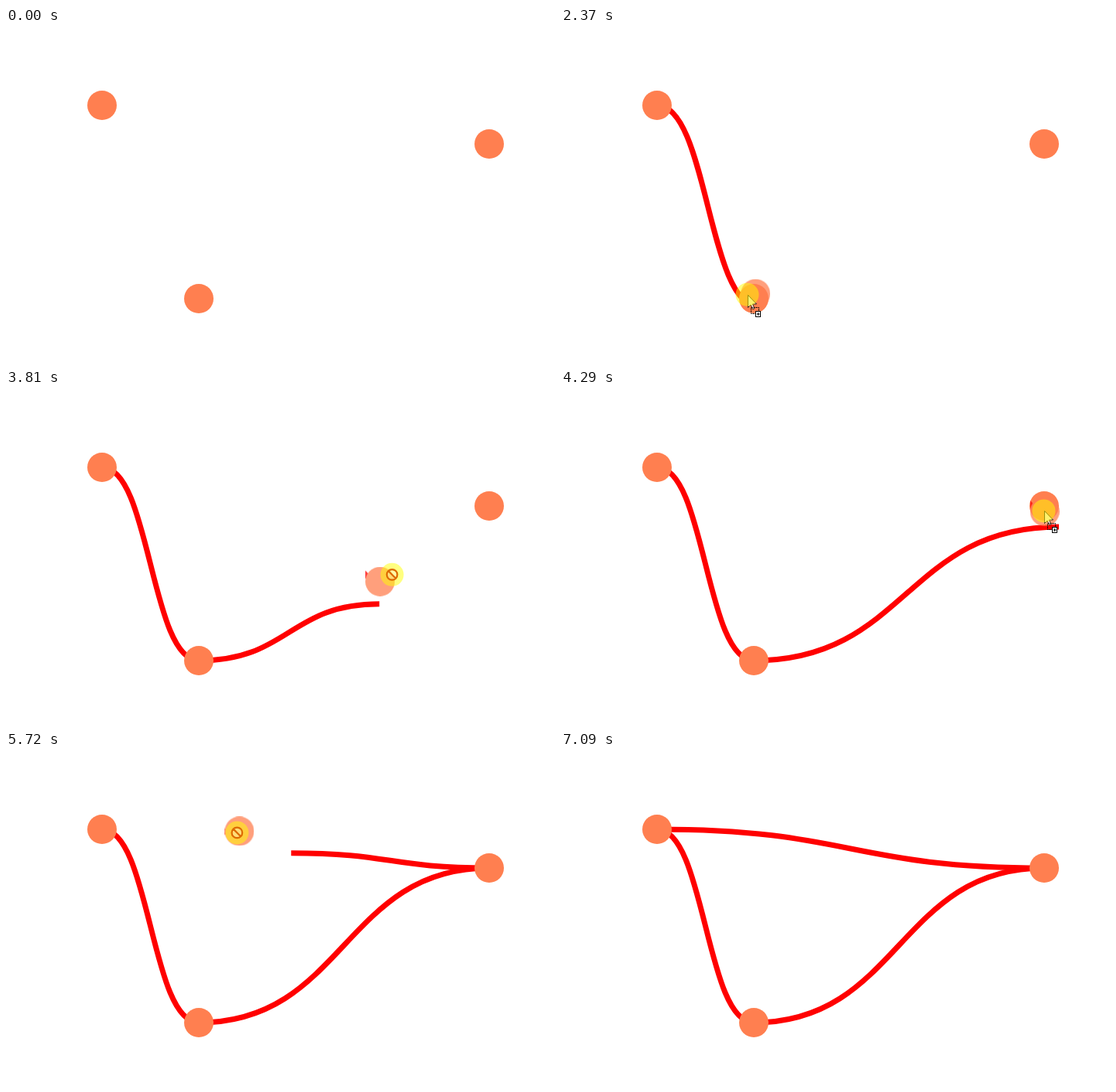
Recreate the animation shown at these times as an HTML page with a canvas. Size 709 px wide and 432 px high, loop 8.68 s.

```html
<!DOCTYPE html>
<html lang="en">
<head>
<meta charset="utf-8">
<title>Connecting dots</title>
<style>
  html, body { margin: 0; width: 100%; height: 100%; overflow: hidden; background: #fff; }
  canvas { display: block; width: 709px; height: 432px; }
</style>
</head>
<body>
<canvas id="stage" width="709" height="432"></canvas>
<script>
const LOOP = 8680, R = 19, LAG = 65;
const ctx = document.getElementById('stage').getContext('2d');
const dots = [[124, 100], [249, 350], [624, 150]];

// Pointer path: time, x, y
const path = [
  [130, 630, 418], [260, 330, 141], [460, 330, 141], [770, 205, 114], [960, 122, 101],
  [1080, 113, 100], [1410, 113, 100], [1480, 119, 110], [1550, 138, 142], [1615, 168, 194],
  [1680, 184, 227], [1850, 210, 279], [2240, 232, 337], [2550, 248, 350], [3250, 248, 350],
  [3325, 256, 354], [3390, 280, 348], [3700, 440, 270], [4090, 614, 170], [4225, 624, 158],
  [4290, 623.5, 156.5], [4500, 626, 147], [4780, 626, 147], [5180, 623, 153], [5260, 623, 153],
  [5340, 590, 148], [5590, 400, 119], [5850, 215, 93], [6075, 134, 83], [6140, 130, 85],
  [6410, 115, 85], [6670, 115, 85], [6840, 290, 150], [7020, 650, 281], [7090, 660, 285]
];

// Each drag links one dot to another; grab is the offset of the ghost from the pointer
const drags = [
  { from: 0, to: 1, press: 1410, start: 1470, drop: 2850, grab: [11, -1], late: 4 },
  { from: 1, to: 2, press: 3250, start: 3300, drop: 4780, grab: [1, 0], late: 30 },
  { from: 2, to: 0, press: 5180, start: 5290, drop: 6670, grab: [3, -2], late: 0 }
];

// Slope at a key, flat where the path turns or rests
function slope(i, k) {
  if (i === 0 || i === path.length - 1) return 0;
  const [a, b, c] = [path[i - 1], path[i], path[i + 1]];
  const p = (b[k] - a[k]) / (b[0] - a[0]), q = (c[k] - b[k]) / (c[0] - b[0]);
  return p * q <= 0 ? 0 : 2 * p * q / (p + q);
}

function pointer(t) {
  let i = 0;
  while (i < path.length - 2 && path[i + 1][0] <= t) i++;
  const a = path[i], b = path[i + 1], d = b[0] - a[0];
  const u = Math.min(1, Math.max(0, (t - a[0]) / d)), v = 1 - u;
  return [1, 2].map(k => i === 0 ? a[k] + (b[k] - a[k]) * u :
    v * v * (1 + 2 * u) * a[k] + u * v * v * d * slope(i, k) +
    u * u * (3 - 2 * u) * b[k] - u * u * v * d * slope(i + 1, k));
}

function disc(g, x, y, r, fill) {
  g.fillStyle = fill;
  g.beginPath();
  g.arc(x, y, r, 0, Math.PI * 2);
  g.fill();
}

function link(g, [x1, y1], [x2, y2]) {
  const mid = (x1 + x2) / 2;
  g.strokeStyle = '#f00';
  g.lineWidth = 7;
  g.beginPath();
  g.moveTo(x1, y1);
  g.bezierCurveTo(mid, y1, mid, y2, x2, y2);
  g.stroke();
}

const dot = (g, p) => disc(g, p[0], p[1], R, '#ff7f50');

// The drag image is a snapshot of the dot's box, links included
drags.forEach((d, n) => {
  const c = document.createElement('canvas'), g = c.getContext('2d'), p = dots[d.from];
  c.width = c.height = 2 * R;
  g.translate(R - p[0], R - p[1]);
  drags.slice(0, n).forEach(e => link(g, dots[e.from], dots[e.to]));
  dot(g, p);
  d.ghost = c;
});

function arrow() {
  ctx.beginPath();
  [[.5, .5], [.5, 16.5], [4, 13], [6.6, 18.7], [9, 17.7], [6.5, 12], [11.5, 12]]
    .forEach(p => ctx.lineTo(...p));
  ctx.closePath();
  ctx.fillStyle = '#fff';
  ctx.fill();
  ctx.strokeStyle = '#000';
  ctx.lineWidth = 1;
  ctx.stroke();
}

function copyBadge() {
  ctx.lineWidth = 1;
  ctx.strokeStyle = '#000';
  ctx.setLineDash([2, 1]);
  ctx.strokeRect(4.5, 16.5, 10, 8);
  ctx.setLineDash([]);
  ctx.fillStyle = '#fff';
  ctx.fillRect(10.5, 21.5, 6, 7);
  ctx.strokeRect(10.5, 21.5, 6, 7);
  ctx.fillStyle = '#000';
  ctx.fillRect(12, 24.5, 3.5, 1);
  ctx.fillRect(13.2, 23, 1, 4);
}

function noDrop() {
  disc(ctx, 0, 0, 7, 'rgba(255,255,255,.3)');
  ctx.strokeStyle = '#dd6a00';
  ctx.lineWidth = 2.2;
  ctx.beginPath();
  ctx.arc(0, 0, 6.8, 0, Math.PI * 2);
  ctx.moveTo(-4.8, -4.8);
  ctx.lineTo(4.8, 4.8);
  ctx.stroke();
}

function cursor(t, x, y, pressed, dragging) {
  const over = dots.some(p => Math.hypot(p[0] - x, p[1] - y) <= R);
  const blocked = dragging && !over;
  ctx.save();
  ctx.translate(x, y);
  if (!blocked) {
    ctx.save();
    ctx.translate(Math.round(x) - x, Math.round(y) - y);
    if (dragging) ctx.globalAlpha = .8;
    arrow();
    ctx.globalAlpha = 1;
    if (dragging) copyBadge();
    ctx.restore();
  }
  if (pressed) disc(ctx, 0, 0, 15, 'rgba(255,255,0,.5)');
  if (blocked) noDrop();
  ctx.restore();
}

function draw(t) {
  ctx.fillStyle = '#fff';
  ctx.fillRect(0, 0, 709, 432);
  const held = drags.find(d => t >= d.press && t < d.drop);
  const active = held && t >= held.start;

  drags.filter(d => t >= d.drop).forEach(d => link(ctx, dots[d.from], dots[d.to]));
  if (active) link(ctx, dots[held.from], pointer(t - LAG).map(v => v + R));
  dots.forEach(p => dot(ctx, p));

  if (active) {
    const [x, y] = pointer(t - held.late);
    ctx.globalAlpha = .75;
    ctx.drawImage(held.ghost, x + held.grab[0] - R, y + held.grab[1] - R);
    ctx.globalAlpha = 1;
  }
  if (t >= 130 && t < 7090) cursor(t, ...pointer(t), !!held, active);
}

const began = performance.now();
function tick() {
  draw((performance.now() - began) % LOOP);
  requestAnimationFrame(tick);
}
tick();
</script>
</body>
</html>
```
